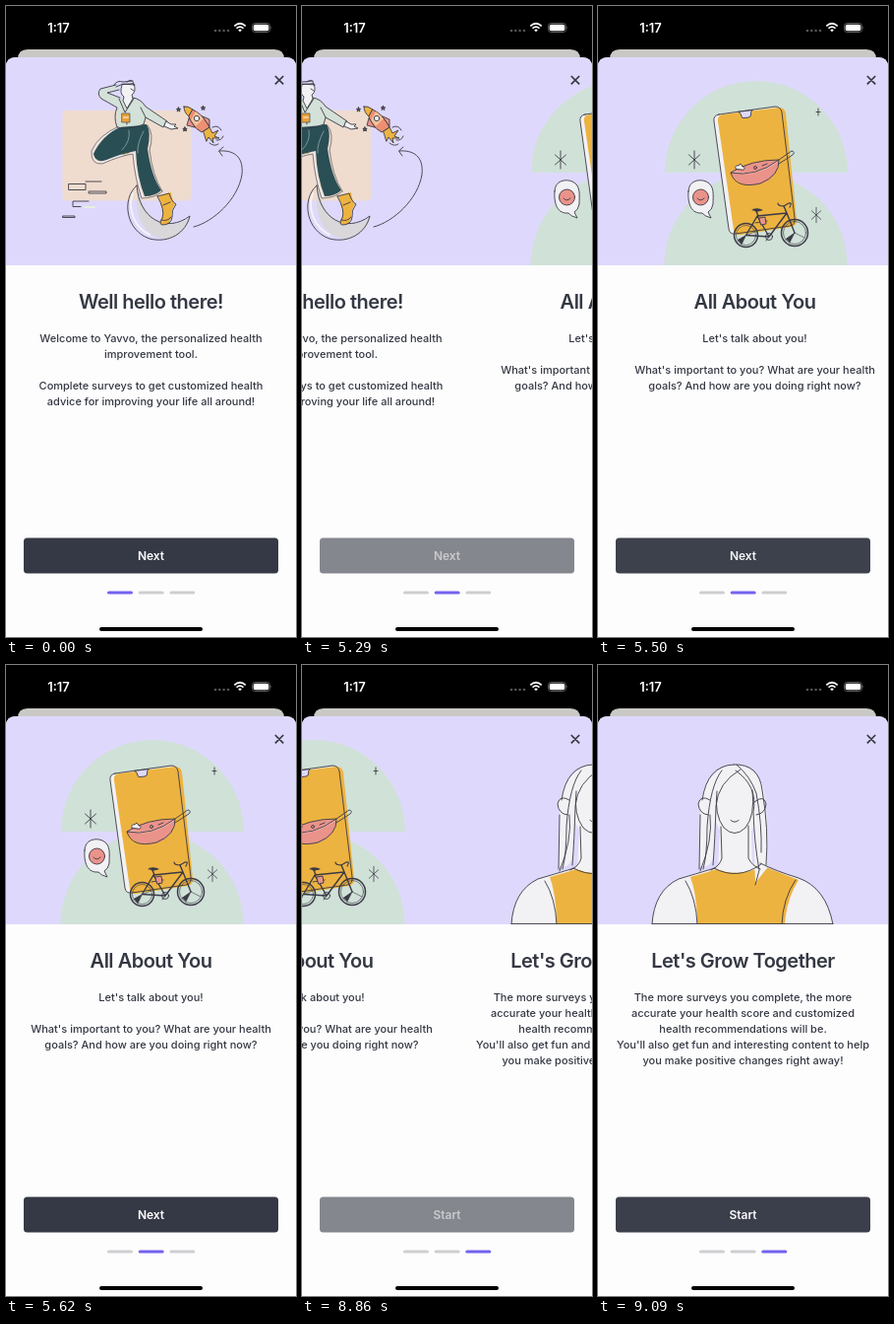
Animation of 295x640 px, one loop 9.21 s. Source, as an HTML page:

```html
<!DOCTYPE html>
<html lang="en">
<head>
<meta charset="utf-8">
<title>Onboarding</title>
<style>
  html, body { margin: 0; width: 100%; height: 100%; overflow: hidden; background: #000; }
  svg { display: block; width: 100%; height: 100%; }
  text { font-family: Inter, sans-serif; text-anchor: middle; fill: #343843; }
  .title { font-size: 20px; font-weight: 600; letter-spacing: -.5px; }
  .body { font-size: 11px; font-weight: 500; }
  .label { font-size: 12px; font-weight: 600; fill: #fff; }
  .clock { font-size: 13px; font-weight: 600; fill: #fff; }
  .art { stroke-linecap: round; stroke-linejoin: round; stroke-width: .9; }
  .l { fill: none; stroke: #3b3a45; }
  .o { stroke: #3b3a45; }
  .thin { stroke-width: .6; }
  .white { fill: #f2f1f4; }
  .gold { fill: #edb340; }
  .teal { fill: #294f54; }
  .mint { fill: #d0e1d8; }
  .pink { fill: #ea938b; }
</style>
</head>
<body>
<svg viewBox="0 0 295 640" preserveAspectRatio="none">
  <defs>
    <clipPath id="hero"><rect x="-20" y="52" width="335" height="211"/></clipPath>
    <path id="star" d="M0-2.2L.7-.7 2.2-.6 1 .4 1.4 2 0 1.1-1.4 2-1 .4-2.2-.6-.7-.7Z"/>
    <path id="spark" d="M0-9V9M-5.5-5L5.5 5M5.5-5L-5.5 5"/>
  </defs>

  <rect width="295" height="640"/>
  <text class="clock" x="53.5" y="26.5">1:17</text>
  <g fill="#555"><circle cx="213" cy="25" r="1.3"/><circle cx="217.3" cy="25" r="1.3"/><circle cx="221.6" cy="25" r="1.3"/><circle cx="225.9" cy="25" r="1.3"/></g>
  <g fill="none" stroke="#fff" stroke-width="1.7">
    <path d="M232.3 20.3Q238 15.2 243.7 20.3M234.5 22.6Q238 19.6 241.5 22.6"/>
    <path d="M236.2 24.2Q238 22.7 239.8 24.2L238 26.3Z" fill="#fff" stroke="none"/>
  </g>
  <rect x="250.5" y="17.5" width="18" height="9" rx="2.8" fill="none" stroke="#777" stroke-width=".8"/>
  <rect x="251.7" y="18.7" width="15.6" height="6.6" rx="1.8" fill="#fff"/>
  <path d="M269.7 20.5q1.4 1.5 0 3z" fill="#777"/>

  <path d="M12 64V54q0-10 10-10H273q10 0 10 10V64Z" fill="#cac8c5"/>
  <path d="M0 640V62q0-10 10-10H285q10 0 10 10V640Z" fill="#fdfdfe"/>
  <path d="M0 263V62q0-10 10-10H285q10 0 10 10V263Z" fill="#ded9fc"/>

  <g id="pages">
    <g class="art" clip-path="url(#hero)">
      <rect x="57.500" y="106" width="130.500" height="91.500" rx="4" fill="#efdccf"/>
      <g class="l">
        <path d="M64 180.500H81V186.500H64ZM81 178H97M84.500 188H102V190H84.500ZM84 198H68V203.500H76"/>
        <path d="M58 213H70V214.500H58Z"/>
      </g>
      <path d="M80 204H90" stroke="#e6f0dc" stroke-width="2"/>

      <path d="M136 183C128 205 137 233 161 236C174 236 184 226 188 214C165 231 137 217 136 183Z" fill="#d9d7da"/>
      <path class="l" d="M133 182C117 196 122 228 146 236C166 241 183 230 187 213C163 231 135 216 133 182Z"/>
      <path d="M129 190C123 206 131 225 146 232" fill="none" stroke="#f4f3f6" stroke-width="2"/>

      <path class="gold o thin" d="M112 139L121 135Q126 140 125 149L121 151L114 148Z"/>
      <path class="gold" d="M155 193L168 189Q169 198 172 201Q168 207 168 214Q168 221 159 222Q155 221 159 215Q161 208 155 193Z"/>
      <path class="l" d="M154 193L166 190Q168 198 173 201Q168 207 169 214Q168 222 159 222Q155 221 159 215Q162 207 154 193M158 217Q164 219 168 214M160 202L167 199"/>

      <path class="teal" d="M118 121L143 120Q148 128 144 145Q148 173 158 187Q151 193 141 193Q133 173 132 147Q116 150 103 156Q91 160 89 150Q97 132 118 121Z"/>
      <path d="M117 122Q96 131 88 147Q87 159 97 159Q115 151 130 149Q132 174 139 194" fill="none" stroke="#eeecf4" stroke-width="1.200"/>
      <path class="l thin" d="M115 122Q94 131 87 147Q86 161 98 160Q116 152 129 150Q131 175 138 195Q151 195 159 188M144 121Q151 130 146 146Q149 172 159 188"/>
      <path d="M125 126Q127 137 118 146M140 127Q133 140 134 149" fill="none" stroke="#9db7b6" stroke-width=".7"/>

      <path d="M115 94L130 92Q137 95 141 102L163 117L160 123L142 114L139 121L114 123Q111 110 114 102L98 94Q93 91 95 85L112 80L114 84L102 88L115 92Z" fill="#d3e1d8"/>
      <path class="l" d="M112 80L96 84Q92 89 97 94L113 103Q109 112 113 123Q126 126 140 120L142 113L160 123L164 117L142 102Q137 94 129 93M115 85L103 88L116 93M115 94L121 108L130 94M137 103L142 113M122 109L123 120"/>
      <path class="white o" d="M118 80Q115 89 120 92L119 96L123 104L129 94L128 90Q133 87 130 79Z"/>
      <path class="l" d="M110 80Q113 75 119 77L129 76M112 82L119 79L131 80M123 77Q129 72 130 80M127 84L130 86"/>
      <path d="M118 109H126V118H118Z" fill="#e9a03b" class="o thin"/>
      <path d="M119.500 113H124.500" stroke="#fff"/>
      <path class="white o" d="M163 117L168 120L173 120L171 122L175 124L168 125L161 122Z"/>

      <path class="gold o" d="M181 102Q185 101 190 105L186 112Q181 108 181 102Z"/>
      <path d="M190 105Q202 111 207 123L199 128Q187 121 186 112Z" fill="#ee8f72" class="o"/>
      <path d="M193 107L188 116L193 122L201 114Z" fill="#f4c39b"/>
      <circle class="white o" cx="194" cy="114" r="2.700"/>
      <path class="pink o" d="M186 114L184 121L192 123ZM200 112L207 115L207 122Z"/>
      <path class="gold o" d="M201 127L207 123L210 129L216 126L212 132L217 134L210 134L211 139L206 133L204 137Z"/>
      <path class="l" d="M210 123Q216 120 219 126M214 136Q219 137 221 132M207 139Q212 143 216 140"/>
      <g class="o" fill="#55505f"><use href="#star" x="175.500" y="105"/><use href="#star" x="200.500" y="103.500"/><use href="#star" x="182" y="125"/></g>
      <path class="l" d="M191 224C211 219 236 196 240 171C242 152 231 146 217 147M221 143L216.500 147L220 152"/>
    </g>

    <g transform="translate(295)">
      <g class="art" clip-path="url(#hero)">
        <path class="mint" d="M56 169a93 93 0 0 1 186 0ZM55.500 263a93 93 0 0 1 186 0Z"/>
        <path class="white" d="M111 110L168 103Q174 103 175 109L188 216Q189 222 183 223L128 231Q122 232 121 226L106 117Q105 111 111 110Z"/>
        <path class="gold" d="M115 110L172 103Q178 103 179 109L190 217Q190 223 185 224L133 232Q127 233 126 227L110 117Q109 111 115 110Z"/>
        <path class="l" d="M111 110L168 102Q174 102 175 108L188 215Q189 222 183 223L128 231Q122 232 121 226L106 117Q105 111 111 110Z"/>
        <path class="o" fill="#ded9fc" d="M131 107.500Q134 109 134 112Q134 114 137 113.500L141 113Q144 112.500 143.500 110Q143 107 145 105.800Z"/>

        <path class="pink" d="M123 168Q147 155 172 157Q171 175 152 181Q128 184 123 168Z"/>
        <path d="M126 168Q147 174 170 158" fill="none" stroke="#f7beb6" stroke-width="1.500"/>
        <path class="l" d="M123 169Q143 156 172 156Q173 172 153 180Q128 186 123 169Q148 174 172 156L185 147Q189 148 186 151L172 160"/>
        <path class="o white" d="M128 165Q127 161 131 162Q133 158 135 163Q139 163 136 166Z"/>
        <circle cx="148" cy="164" r="1.500" class="l"/><path class="l" d="M155 162L160 160"/>

        <path class="white o" d="M80 188C80 177 91 175 98 178C107 182 105 192 105 201Q104 207 100 209L103 215Q96 213 94 210C83 211 79 201 80 188Z"/>
        <circle class="pink o" cx="92.500" cy="194" r="8"/>
        <path class="l" d="M89 195Q92 199 96 195"/>
        <g class="l"><use href="#spark" x="86" y="156"/><use href="#spark" transform="translate(210 212) scale(.85)"/><path d="M212 104V111M210 107.500H214"/></g>

        <g class="l">
          <g stroke-width="1.500"><circle cx="138.500" cy="232.500" r="12"/><circle cx="188" cy="230" r="13.500"/></g>
          <g class="thin"><circle cx="138.500" cy="232.500" r="10"/><circle cx="188" cy="230" r="11.500"/>
          <path d="M138.500 232.500L130 238M138.500 232.500L134 242M138.500 232.500L148 229M188 230L179 237M188 230L183 240M188 230L198 235"/></g>
          <path stroke-width="1.400" d="M138.500 232.500L150 213L180 210L162 234ZM150 213L162 234M149 208L151 213M180 210L177 203M180 210L188 230"/>
          <path stroke-width="1.200" d="M177 203Q171 203 171 200M177 203L182 200Q186 199 183 204"/>
          <circle cx="162" cy="234" r="3.500"/><path d="M159 238L166 229M145 207H154M148 220L160 218"/>
        </g>
        <path d="M145 206Q151 204 156 207L149 209Z" fill="#3b3a45"/>
        <path class="pink o" d="M152 215L158 214L159 221L154 222Z"/>
        <path d="M130 237L138.500 232.500L134 242ZM179 236L188 230L183 240Z" fill="#3b3a45"/>
      </g>
    </g>

    <g transform="translate(590)">
      <g class="art" clip-path="url(#hero)">
        <path class="white" d="M55 264Q57 229 82 217Q99 211 122 205L124 168Q107 135 121 110Q138 91 155 110Q170 137 156 169L157 201Q177 208 203 216Q232 226 239 264Z"/>
        <path class="gold" d="M94 215Q109 211 121 207Q143 216 168 204L204 218Q191 239 190 264H101Q101 234 94 215Z"/>
        <path class="white" d="M118 111Q104 121 104 155L103 204Q116 207 118 191L121 143Q125 123 142 105Q157 120 157 142L160 221L172 206Q174 147 167 121Q157 101 138 101Q126 102 118 111Z"/>
        <g class="white o"><path d="M114 137Q104 131 102 141Q103 151 112 152M159 139Q169 131 171 141Q170 151 161 152"/></g>
        <g class="l">
          <path d="M55 263Q57 229 82 217Q99 212 119 206M165 201Q181 209 204 216Q232 226 239 263M89 219Q100 237 101 263M201 218Q188 237 187 263M118 206Q142 219 166 202M55 262.500H239"/>
          <path d="M121 128Q118 152 128 165Q139 176 150 165Q160 153 157 127M125 164L126 196Q124 204 115 208M153 163V196Q157 204 165 207"/>
          <path d="M138 101Q111 102 106 137M114 152Q117 178 104 209M104 152L103 207M138 101Q164 100 167 127Q174 166 171 203M145 106Q122 119 120 143Q119 178 117 203M140 107Q163 123 158 149Q159 181 164 208L160 223M126 107Q114 122 111 164Q111 193 107 207M141 101Q155 113 161 130Q167 161 166 190"/>
          <path d="M135 157.500Q139 161 143 157.500"/>
        </g>
      </g>
    </g>
  </g>

  <path d="M273.800 71L282.200 79.400M282.200 71L273.800 79.400" stroke="#343843" stroke-width="1.700"/>
  <rect id="button" x="18" y="539.500" width="259" height="36" rx="3.500"/>
  <text id="label" class="label" x="147.500" y="561.700">Next</text>
  <g id="dots">
    <rect x="103" y="593.500" width="26" height="3" rx="1.500"/>
    <rect x="134.700" y="593.500" width="26" height="3" rx="1.500"/>
    <rect x="166.300" y="593.500" width="26" height="3" rx="1.500"/>
  </g>
  <rect x="95" y="630" width="105" height="4" rx="2"/>
</svg>

<script>
const LOOP = 9210;
const WIDTH = 295;
const $ = id => document.getElementById(id);
const pages = $('pages'), button = $('button'), label = $('label');
const dots = [...$('dots').children];

// Copy: title, then [baseline, line] pairs.
const copy = [
  ['Well hello there!',
    [341, 'Welcome to Yavvo, the personalized health'], [357, 'improvement tool.'],
    [389, 'Complete surveys to get customized health'], [405, 'advice for improving your life all around!']],
  ['All About You',
    [341, "Let's talk about you!"],
    [373, "What's important to you? What are your health"], [389, 'goals? And how are you doing right now?']],
  ["Let's Grow Together",
    [341, 'The more surveys you complete, the more'], [357, 'accurate your health score and customized'],
    [373, 'health recommendations will be.'], [389, "You'll also get fun and interesting content to help"],
    [405, 'you make positive changes right away!']],
];

function addText(page, y, str, cls) {
  const t = document.createElementNS('http://www.w3.org/2000/svg', 'text');
  t.setAttribute('x', page * WIDTH + WIDTH / 2);
  t.setAttribute('y', y);
  t.setAttribute('class', cls);
  t.textContent = str;
  pages.append(t);
}
copy.forEach(([title, ...lines], page) => {
  addText(page, 307, title, 'title');
  lines.forEach(([y, str]) => addText(page, y, str, 'body'));
});

// Held poses: start time, scroll, button strength, dot strengths.
const poses = [
  [0, 0, 1, [1, 0, 0]],
  [5180, 2, 0, [.9, .3, 0]],
  [5290, 118, .48, [0, 1, 0]],
  [5400, 243, .8, [0, 1, 0]],
  [5500, 283, .95, [0, 1, 0]],
  [5620, 295, 1, [0, 1, 0]],
  [8760, 310, 0, [0, .6, .6]],
  [8860, 432, .48, [0, 0, 1]],
  [8960, 548, .8, [0, 0, 1]],
  [9090, 590, .96, [0, 0, 1]],
];

const mix = (a, b, k) => `rgb(${a.map((v, i) => Math.round(v + (b[i] - v) * k))})`;
const OFF = [207, 207, 209], DARK = [53, 57, 69], ACCENT = [114, 99, 238];

function render(t) {
  const [, scroll, strength, lit] = poses.findLast(p => p[0] <= t);
  pages.setAttribute('transform', `translate(${-scroll})`);
  button.setAttribute('fill', mix(OFF, DARK, strength));
  label.setAttribute('opacity', .15 + .85 * strength);
  label.textContent = scroll > WIDTH ? 'Start' : 'Next';
  dots.forEach((d, i) => d.setAttribute('fill', mix(OFF, ACCENT, lit[i])));
}

const start = performance.now();
function tick() {
  render((performance.now() - start) % LOOP);
  requestAnimationFrame(tick);
}
tick();
</script>
</body>
</html>
```
